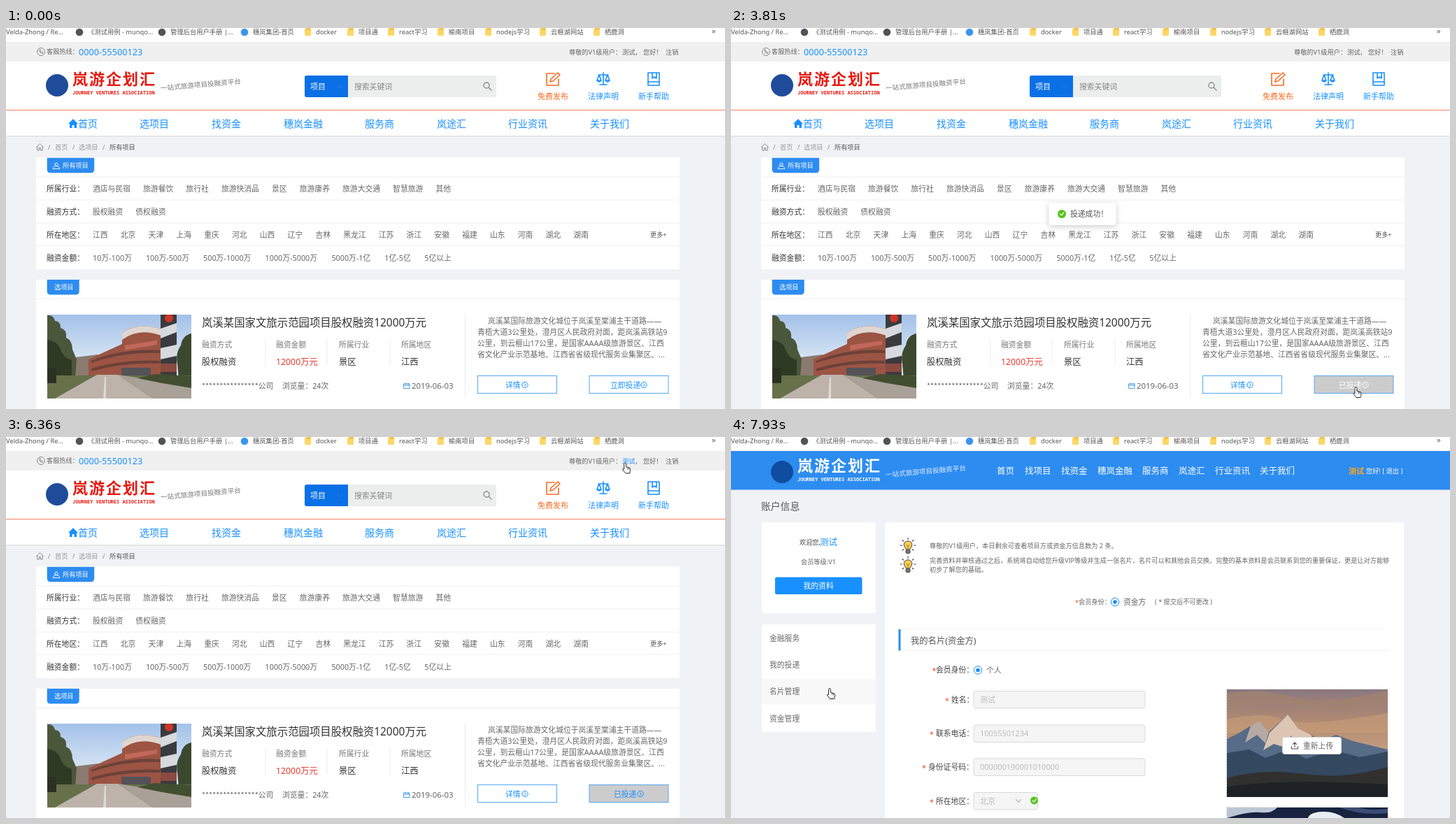
An HTML page for the animation above (8000 ms loop, 1028 px wide and 545 px high).

```html
<!DOCTYPE html>
<html lang="zh-CN">
<head>
<meta charset="utf-8">
<title>项目投递</title>
<style>
html, body { margin: 0; width: 100%; height: 100%; overflow: hidden; background: #f0f2f5; }
svg { display: block; width: 100%; height: 100%; }
text { font-family: "Noto Sans", "Noto Sans CJK SC", sans-serif; white-space: pre; }
.cjk { font-family: "Noto Sans CJK SC", sans-serif; }
.mono { font-family: "Noto Sans Mono", monospace; }
.line { fill: none; stroke: currentColor; stroke-width: 1.3; stroke-linejoin: round; stroke-linecap: round; }
</style>
</head>
<body>
<svg id="stage" viewBox="0 0 1028 545"></svg>
<script>
const LOOP = 8000, BLUE = '#1890ff', BAR = '#2d8cf0', EDGE = '#55a8f6', SMALL = 9.2, BODY = 10.8;

// Drawing helpers; text is placed by its left edge and vertical centre.
const text = (x, y, str, size = BODY, fill = '#666', attrs = '') =>
  `<text x="${x}" y="${(y + size * .37).toFixed(2)}" font-size="${size}" fill="${fill}" ${attrs}>${str}</text>`;
const rect = (x, y, w, h, fill, attrs = '') =>
  `<rect x="${x}" y="${y}" width="${w}" height="${h}" fill="${fill}" ${attrs}/>`;
const dot = (x, y, r, fill, attrs = '') => `<circle cx="${x}" cy="${y}" r="${r}" fill="${fill}" ${attrs}/>`;
const path = (d, fill, attrs = '') => `<path d="${d}" fill="${fill}" ${attrs}/>`;
const icon = (x, y, d, color, width = 1.3) =>
  `<path class="line" transform="translate(${x} ${y})" style="color:${color};stroke-width:${width}" d="${d}"/>`;
const group = (id, ...parts) => `<g id="${id}">${parts.join('')}</g>`;
const clipped = (id, x, y, w, h, ...parts) =>
  `<clipPath id="${id}">${rect(x, y, w, h, '#000')}</clipPath><g clip-path="url(#${id})">${parts.join('')}</g>`;
const gradient = (id, ...colors) => `<linearGradient id="${id}" x2="0" y2="1">${colors.map((c, i) =>
  `<stop offset="${i / (colors.length - 1)}" stop-color="${c}"/>`).join('')}</linearGradient>`;

const HOUSE = 'M-5 0L0-5 5 0M-3.7-1V4.5H-1V1H1V4.5H3.7V-1';
const CIRCLE_ARROW = 'M-4.2 0a4.2 4.2 0 1 0 8.4 0a4.2 4.2 0 1 0-8.4 0M-1-2.2L1.4 0-1 2.2';
const CHECK = 'M-2.5 0l2 2 3.2-3.8';
const CHEVRON = 'M-3.5-2L0 2 3.5-2';

const bookmarks = () => {
  const label = (x, str) => text(x, 6, str, 9.3, '#555');
  const folder = (x, str) => rect(x, 1, 9, 10, '#fbd766', 'rx="1"') +
    rect(x + 2, 0, 7, 3, '#f3c34c', 'rx="1"') + label(x + 16, str);
  const site = (x, color, str) => dot(x, 6, 5.3, color) + label(x + 12, str);
  return rect(0, 0, 1028, 20, '#fff') + label(0, 'Velda-Zhong / Re...') +
    site(105, '#505357', '《测试用例 - munqo...') + site(223, '#505357', '管理后台用户手册 |...') +
    site(341, '#3b95ee', '穗岚集团-首页') +
    folder(427, 'docker') + folder(488, '项目通') + folder(546, 'react学习') + folder(617, '榆南项目') +
    folder(685, 'nodejs学习') + folder(763, '云榧湖网站') + folder(840, '栖鹿洞') +
    text(1009, 4, '»', 11, '#555');
};

const brand = (y, mark, title, sub) => dot(73, y, 16, mark) +
  text(95, y - 9, '岚游企划汇', 22, title, 'font-weight="700" letter-spacing="2"') +
  text(95, y + 10, 'JOURNEY VENTURES ASSOCIATION', 7, title, 'class="mono" font-weight="600"') +
  `<g transform="rotate(-5 221 ${y + 4})">${text(221, y + 4, '一站式旅游项目投融资平台', 9.6, sub)}</g>`;

const tag = (w, y, str, x) => path(`M58.700 ${y}h${w}v16.500q0 5-5 5h${10 - w}q-5 0-5-5z`, BAR) +
  text(x, y + 10.7, str, SMALL, '#fff');

const advance = str => [...str].reduce((w, c) => w + (/\d/.test(c) ? 6.3 : c === '-' ? 4.6 : 10.75), 0);
const filterRow = (y, label, items) => {
  let x = 124;
  return text(58, y, label + '：', BODY, '#333') + items.split(' ').map(item => {
    const cell = text(x, y, item);
    x += advance(item) + 18.3;
    return cell;
  }).join('');
};

const building = () => clipped('shot', 59, 410, 206, 120,
  rect(59, 410, 206, 120, 'url(#day)'),
  path('M92 472l40-5v30H92z', '#8a7a70'),
  path('M118 499V474L166 452V436Q190 420 222 431L244 440V505L170 506z', '#9c5443'),
  path('M166 436Q190 420 222 431V440Q190 428 166 446z', '#e0d6cf'),
  path('M122 476q45-18 98-15v4q-52-2-98 14zM122 487q48-14 98-11v4q-50-2-98 11z', '#6b4238'),
  path('M170 454l46-7v6l-46 8z', '#c2685a'),
  path('M165 486h42v18h-42z', '#545257'),
  rect(221, 410, 23, 96, '#3a3b3f'),
  path('M221 430l23-8v13l-23 9zM221 458l23-5v16l-23 5z', '#d6d9dd'),
  path('M221 480h23v12h-23z', '#8b4a40'), dot(233, 415, 6, '#cf3428'),
  path('M59 411q9-1 11 8 8 0 8 10 9 2 8 14 9 4 9 17l6 14-2 25H59z', '#4b573a'),
  path('M59 446q15 2 19 14t16 15v24H59z', '#2f3a25'),
  path('M265 437q-13 3-15 17-8 11-5 26l2 24h18z', '#3c482e'),
  path('M59 497H265V530H59z', '#66714a'),
  path('M130 496h30L210 530H70z', '#bdb3ab'),
  path('M160 496l52 8 53 10V530H210z', '#a9a097'),
  path('M188 501l25-6 52 3v17l-42-7z', '#424e30'),
  path('M141 499h2v31h-4z', '#dedad3'),
  rect(59, 486, 13, 22, '#2a3123'));

const listPage = () => {
  const nav = (x, str, attrs) => text(x, 137, str, 14, BLUE, attrs);
  const link = (x, str, color, d) => text(x, 98, str, 11, color) + icon(x + 22, 73, d, color, 1.6);
  const field = (x, name, value, color = '#333') => text(x, 453, name, BODY, '#777') + text(x, 477, value, 12.3, color);
  return rect(0, 20, 1028, 525, '#f0f2f5') + rect(0, 20, 1028, 28, '#f0f0f0') +
    rect(0, 48, 1028, 106, '#fff') + rect(0, 117, 1028, 1, '#f4875f') + rect(0, 154, 1028, 1.5, '#dfe1e4') +
    icon(50, 34, 'M-5.5 0a5.5 5.5 0 1 0 11 0a5.5 5.5 0 1 0-11 0M-2.2-2.5Q-2 2 2.4 2.5L3 1 1.3 0 .4.8-1-.8-.4-1.5-1-3z', '#888', 1) +
    text(58, 34, '客服热线：', SMALL) + text(104, 34, '0000-55500123', 12.7, BLUE) +
    text(805, 35, '尊敬的V1级用户：', SMALL) + text(881, 35, '测试', SMALL, '#666', 'id="user"') +
    text(899, 35, '，', SMALL) + text(911, 35, '您好！', SMALL) + text(943, 35, '注销', SMALL) +
    brand(82, '#1f4b9b', '#e8190f', '#777') +
    rect(427, 68, 274, 31, '#eceded', 'rx="3"') + path('M430 68h59v31h-59q-3 0-3-3v-25q0-3 3-3', '#0a70e6') +
    text(435, 84, '项目', 11, '#fff') + icon(477, 84, CHEVRON, '#2a80e4', 1) + text(498, 83.5, '搜索关键词', BODY, '#888') +
    icon(687, 82, 'M-4 0a4 4 0 1 0 8 0a4 4 0 1 0-8 0M3 3L7 7', '#888') +
    link(760, '免费发布', '#fa6a20', 'M2-8H-9V9H8V0M-4 4L-3 0 7-9 10-6 0 3z') +
    link(832, '法律声明', BLUE, 'M0-9V8M-5 8H5M-7-6H7M-6-6L-9 2H-3zM6-6L3 2H9zM-9 2q3 4 6 0M3 2q3 4 6 0') +
    link(904, '新手帮助', BLUE, 'M-8-9H8V9H-8zM-8 4H8M-2-9V-1L1-3 4-1V-9') +
    path('M89 137l7-7 7 7h-2v6h-3.500v-4h-3v4H91v-6z', BLUE) +
    nav(103, '首页') + nav(191, '选项目') + nav(294, '找资金') + nav(397, '穗岚金融') + nav(513, '服务商') +
    nav(616, '岚途汇') + nav(718, '行业资讯') + nav(835, '关于我们', 'id="about"') +
    icon(48.5, 170.5, HOUSE, '#888', 1) +
    [60, 95, 138].map(x => text(x, 170.5, '/', SMALL, '#888')).join('') +
    text(70, 170.5, '首页', SMALL, '#999') + text(104, 170.5, '选项目', SMALL, '#999') + text(148, 170.5, '所有项目', SMALL, '#555') +
    rect(43, 185, 920, 160, '#fff') + tag(67.5, 185.7, '所有项目', 81) +
    icon(72, 197, 'M-2.200-1.800a2.200 2.200 0 1 0 4.400 0a2.200 2.200 0 1 0-4.400 0M-4.800 4q.3-3.500 4.800-3.500t4.800 3.500z', '#fff', .9) +
    [213, 246, 279, 311].map(y => rect(43, y - .5, 920, 1, '#f0f0f0')).join('') +
    filterRow(229.5, '所属行业', '酒店与民宿 旅游餐饮 旅行社 旅游快消品 景区 旅游康养 旅游大交通 智慧旅游 其他') +
    filterRow(262.5, '融资方式', '股权融资 债权融资') +
    filterRow(295.5, '所在地区', '江西 北京 天津 上海 重庆 河北 山西 辽宁 吉林 黑龙江 江苏 浙江 安徽 福建 山东 河南 湖北 湖南') +
    filterRow(328.5, '融资金额', '10万-100万 100万-500万 500万-1000万 1000万-5000万 5000万-1亿 1亿-5亿 5亿以上') +
    text(921, 295.5, '更多+', SMALL, '#555') +
    rect(43, 360, 920, 185, '#fff') + tag(46, 360, '选项目', 69) + rect(43, 387, 920, 1, '#eee') + building() +
    text(280, 421, '岚溪某国家文旅示范园项目股权融资12000万元', 15.4, '#333') +
    field(280, '融资方式', '股权融资') + field(386, '融资金额', '12000万元', '#e8392f') +
    field(476, '所属行业', '景区') + field(565, '所属地区', '江西') +
    [371, 459, 549].map(x => rect(x - .5, 445, 1, 38, '#eee')).join('') + rect(656, 409, 1, 120, '#eee') +
    text(280, 512, '****************公司', BODY, '#666', 'class="cjk"') + text(395, 512, '浏览量：24次') +
    icon(573, 512, 'M-4-3H4V3.500H-4zM-4-.8H4M-2-4V-2M2-4V-2', '#4a9be8', 1) + text(580, 512, '2019-06-03', 11.4) +
    text(689, 418.5, '岚溪某国际旅游文化城位于岚溪至棠浦主干道路——') +
    text(674, 434.5, '青梧大道3公里处，澄月区人民政府对面，距岚溪高铁站9') +
    text(674, 450.5, '公里，到云榧山17公里，是国家AAAA级旅游景区、江西') +
    text(674, 466.5, '省文化产业示范基地、江西省省级现代服务业集聚区、...') +
    rect(674.5, 497.5, 113, 25, '#fff', `stroke="${EDGE}"`) + text(714, 510.5, '详情', BODY, BLUE) +
    icon(742, 510.5, CIRCLE_ARROW, BLUE, 1) +
    rect(834, 497.5, 113, 25, '#fff', `id="send" stroke="${EDGE}"`) +
    `<g id="sendInk" style="color:${BLUE}">` +
    group('before', text(864, 510.5, '立即投递', BODY, 'currentColor'), icon(912, 510.5, CIRCLE_ARROW, 'inherit', 1)) +
    group('after', text(869, 510.5, '已投递', BODY, 'currentColor'), icon(907, 510.5, CIRCLE_ARROW, 'inherit', 1)) + '</g>' +
    group('toast', rect(454.5, 250, 96, 32, '#fff', 'rx="3" style="filter:drop-shadow(0 2px 4px #0003)"'),
      dot(473, 266, 6, '#52c41a'), icon(473, 266, CHECK, '#fff'), text(485, 266, '投递成功！', BODY, '#555'));
};

const bulb = y => `<g transform="translate(253 ${y})">` +
  icon(0, 0, 'M0-12V-9.500M-11-1h2.500M8.500-1H11M-8-8.500l1.700 1.700M8-8.500L6.300-6.800M-8 6l1.700-1.500M8 6L6.300 4.500', '#444', 1.1) +
  path('M-3 5Q-3 3-5 1Q-7-3-4.500-5.500Q0-9 4.500-5.500Q7-3 5 1Q3 3 3 5z', '#f9cf58', 'stroke="#444"') +
  rect(-3, 5.5, 6, 5, '#777', 'rx="1.5" stroke="#444"') + icon(0, 1, 'M-2-3L0 0 2-3M0 0V4', '#a56b20', .9) + '</g>';

const mountains = () => clipped('peak', 709, 361, 230, 154,
  rect(709, 361, 230, 154, 'url(#dusk)'),
  path('M709 368q45-10 90 3t140-8v18q-60 15-110 5t-120 4z', '#a3846f', 'opacity=".7"'),
  path('M709 404q50-12 80 0t150-9v28H709z', '#c99f78', 'opacity=".6"'),
  path('M709 432l18-9 16-10 12-7 14 16 15-14 12-11 15 20 18 9 16 8 20-8 24 9 50 12v70H709z', '#566c87'),
  path('M796 397l15 20 18 9 12 18-18-7-12 8-10-18-9 17-16-5-15 9 9-25 14-14z', '#dcc5b2'),
  path('M755 406l14 16-5 16-12-12-17 11 8-24z', '#b8a9a4'),
  path('M709 452l32-5 23 12 33-12 25 13 40-12 37 10 40-8v60H709z', '#34485f'),
  path('M709 488q50-14 110-6t120-10v43H709z', '#30302f'),
  path('M709 501q70-13 230-4v18H709z', '#1e2226')) +
  clipped('night', 709, 530, 230, 15, rect(709, 530, 230, 15, '#17233f'),
    path('M709 530h72q-8 9-24 7t-48 8z', '#bcc6d5'), path('M825 545q2-8 20-9t32 9z', '#e8edf5'),
    path('M870 530h28q12 5 41 2v6q-36 4-69-8z', '#3b4d75'));

const accountPage = () => {
  const nav = (x, str) => text(x, 48.5, str, 12.5, '#fff', 'font-weight="500"');
  const star = (x, y, size = BODY) => text(x, y + 1, '*', size, '#f04c22');
  const radio = (x, y) => dot(x, y, 5.7, '#fff', `stroke="${BLUE}"`) + dot(x, y, 2.8, BLUE);
  const entry = (y, x, name, value, w = 245) => star(x - 9, y) + text(x, y, name + '：', BODY, '#444') +
    rect(347, y - 12, w, 24.5, '#f5f5f5', 'rx="3" stroke="#d9d9d9"') + text(356, y, value, 11, '#bbb');
  const card = (x, y, w, h) => rect(x, y, w, h, '#fff', 'rx="3"');
  const slot = y => rect(708.5, y, 229.5, 153, '#fff', 'stroke="#d0d0d0" stroke-dasharray="2 2"');
  return rect(0, 20, 1028, 525, '#f0f2f5') + rect(0, 20, 1028, 55.5, BAR) +
    nav(380, '首页') + nav(420, '找项目') + nav(472, '找资金') + nav(524, '穗岚金融') + nav(588, '服务商') +
    nav(640, '岚途汇') + nav(692, '行业资讯') + nav(756, '关于我们') +
    text(883, 48.5, '测试', 11, '#ffa51f', 'font-weight="700"') + text(908, 49, '您好! [ 退出 ]', SMALL, '#fff') +
    text(43, 98.5, '账户信息', 13.8, '#555') +
    card(44, 122, 163, 130) + text(98, 151, '欢迎您,', SMALL, '#444') + text(127, 150.5, '测试', 12.5, BLUE) +
    text(100, 179, '会员等级:V1', SMALL) + rect(63, 200.5, 124.5, 24.5, BLUE, 'rx="2.5"') +
    text(103.5, 213, '我的资料', BODY, '#fff') +
    card(44, 268, 163, 154) + group('rowHover', rect(44, 346, 163, 37, '#f8f8f8')) +
    ['金融服务', '我的投递', '名片管理', '资金管理'].map((str, i) => text(55, 288 + i * 38.2, str)).join('') +
    card(220, 122, 742, 440) +
    text(284, 155.5, '尊敬的V1级用户，本日剩余可查看项目方或资金方信息数为 2 条。', SMALL) +
    text(284, 176.5, '完善资料并审核通过之后，系统将自动给您升级VIP等级并生成一张名片，名片可以和其他会员交换。完整的基本资料是会员联系到您的重要保证，更是让对方能够', SMALL) +
    text(284, 190, '初步了解您的基础。', SMALL) +
    star(492, 236, SMALL) + text(497, 236, '会员身份：', SMALL) + radio(549, 236) + text(561, 236, '资金方') +
    text(606, 236, '( * 提交后不可更改 )', SMALL) +
    [274.5, 305.5].map(y => path(`M242 ${y}H942`, 'none', 'stroke="#eee" stroke-dasharray="2 1"')).join('') +
    rect(239.5, 275, 3, 30.5, BAR) + text(257, 291, '我的名片(资金方)', 12.3, '#555') +
    star(287.5, 333) + text(293, 333, '会员身份：', BODY, '#444') + radio(353, 333.5) + text(365, 333.5, '个人') +
    entry(375.5, 315, '姓名', '测试') + entry(424, 293, '联系电话', '10055501234') +
    entry(472, 282, '身份证号码', '000000190001010000') + entry(520.5, 293, '所在地区', '北京', 91.5) +
    icon(411, 520.5, CHEVRON, '#bbb') +
    `<g transform="translate(433.5 520)">${group('tick', dot(0, 0, 5.5, '#52c41a'), icon(0, 0, CHECK, '#fff'))}</g>` +
    slot(361) + slot(529.5) + group('photos', mountains()) +
    rect(788.5, 429.5, 84, 24, '#fff', 'rx="3" stroke="#d9d9d9"') +
    icon(806, 441.5, 'M-4.500 1V4.500H4.500V1M0 2V-4.500M-2.500-2L0-4.500 2.500-2', '#555', 1.1) + text(818, 441.5, '重新上传') +
    group('art', brand(50, '#0f4da0', '#fff', '#e3efff'), bulb(156), bulb(183));
};

const cursor = () => group('cursor', group('click', dot(0, 0, 9.5, '#ffe100', 'opacity=".7"')),
  group('arrow', path('M0 0v12l3-2.600 2 4.400 2-.9-2-4.300h4z', '#fff', 'stroke="#222" stroke-width=".9"')),
  group('hand', path('M-1.500 1.500q0-1.800 1.500-1.800t1.500 1.800v4l4.500 1.200q1.700.5 1.500 2.500l-.8 5.300h-6.200l-4.200-5.500q.6-1.600 2.200-.3z',
    '#fff', 'stroke="#222" stroke-width="1"'), icon(0, 0, 'M3.500 6.500V9M5.500 7V9', '#222', .7)));

document.getElementById('stage').innerHTML =
  gradient('day', '#a3c1e8', '#d3e2f3', '#f3f4f4') + gradient('dusk', '#8a7880', '#b58c70', '#c9a488', '#7f879b') +
  rect(0, 0, 1028, 545, '#f0f2f5') + group('list', listPage()) + group('account', accountPage()) +
  bookmarks() + cursor();

// Timeline: every part runs on one shared loop, times in ms.
const play = (id, steps, easing = 'linear') => document.getElementById(id).animate(
  steps.map(([t, props]) => ({ offset: t / LOOP, easing, ...props })), { duration: LOOP, iterations: Infinity });
const toggle = (id, times, on = 0) => play(id,
  [0, ...times, LOOP].map((t, i) => [t, { opacity: (i + on) % 2 }]), 'step-end');
const fade = (id, prop, ...steps) => play(id, steps.map(([t, value]) => [t, { [prop]: value }]));

toggle('list', [6520], 1);
toggle('account', [6670]);
toggle('art', [6760]);
toggle('photos', [6920]);
toggle('rowHover', [7700]);
toggle('before', [2640], 1);
toggle('after', [2640]);
toggle('click', [2400, 2480, 6210, 6360]);
toggle('hand', [390, 4270, 5020, 5110, 5220, 5400, 5780, 6760, 7700]);
toggle('arrow', [310, 390, 4270, 5020, 5110, 5220, 5400, 5780, 6760, 7700]);

fade('send', 'fill', [0, '#fff'], [390, '#fff'], [640, BAR], [2640, BAR], [2870, '#ccc'], [LOOP, '#ccc']);
fade('sendInk', 'color', [0, BLUE], [390, BLUE], [640, '#fff'], [4270, '#fff'], [4500, BLUE], [LOOP, BLUE]);
fade('about', 'fill', [0, BLUE], [5020, BLUE], [5150, '#55adff'], [5290, '#48a6ff'], [5480, BLUE], [LOOP, BLUE]);
fade('user', 'fill', [0, '#666'], [5780, '#666'], [5950, BLUE], [LOOP, BLUE]);

play('toast', [
  [0, { opacity: 0, transform: 'translateY(-24px)' }],
  [2640, { opacity: 0, transform: 'translateY(-24px)', easing: 'cubic-bezier(.08,.82,.17,1)' }],
  [2870, { opacity: 1, transform: 'none' }],
  [4480, { opacity: 1, transform: 'none', easing: 'ease-in' }],
  [4760, { opacity: 0, transform: 'translateY(-8px)' }],
  [LOOP, { opacity: 0, transform: 'translateY(-8px)' }]]);
play('tick', [
  [0, { transform: 'scale(0)' }], [6640, { transform: 'scale(0)' }], [6670, { transform: 'scale(.25)' }],
  [6830, { transform: 'scale(1.12)' }], [6920, { transform: 'scale(1)' }], [LOOP, { transform: 'scale(1)' }]]);
play('cursor', [
  [0, 959, 538], [310, 959, 538], [400, 945, 524], [560, 915, 519], [790, 892.5, 515],
  [3810, 893.5, 514], [4190, 893.5, 514], [4270, 895, 495], [4580, 902, 318],
  [4740, 904, 290], [4900, 908, 220], [5050, 907, 140], [5290, 895, 100], [5520, 890, 60],
  [5780, 886, 42], [6210, 885, 37], [6670, 885.5, 38], [6760, 870, 46], [7000, 730, 105],
  [7470, 441, 229], [7620, 230, 300], [7760, 87, 345], [7930, 141, 360], [LOOP, 141, 360]
].map(([t, x, y]) => [t, { transform: `translate(${x}px, ${y}px)` }]));
</script>
</body>
</html>
```
